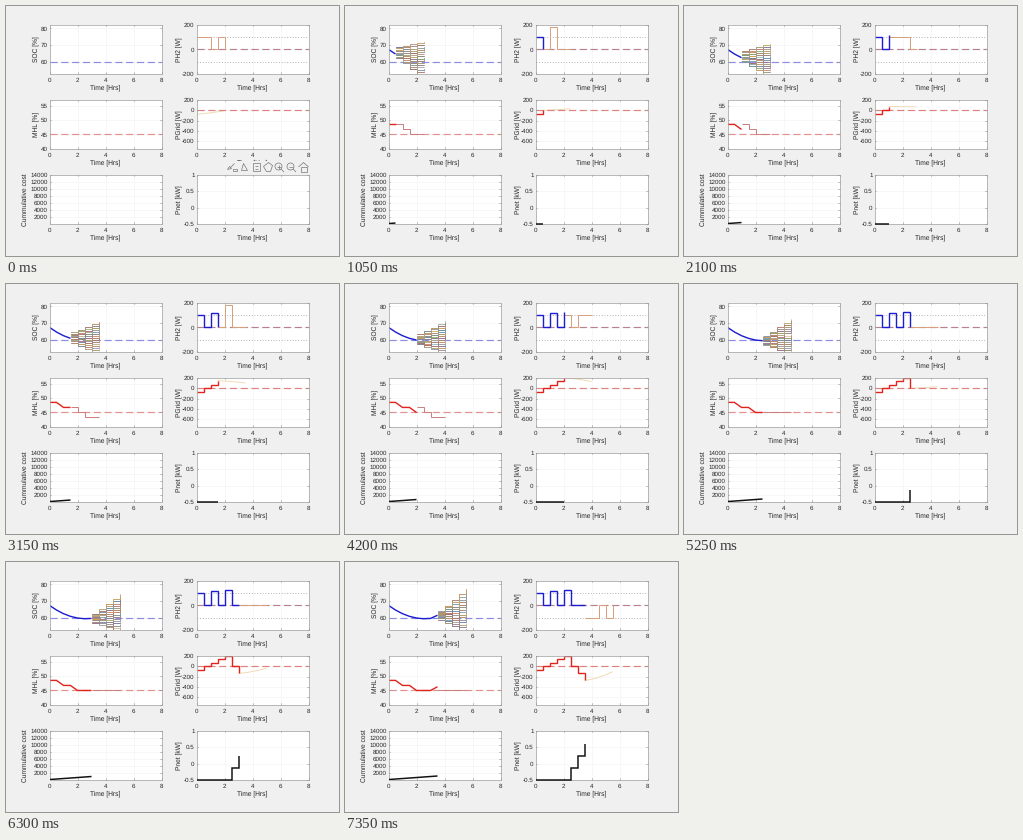
A matplotlib script for the animation above (8000 ms loop, 333 by 250 pixels).

```python
import numpy as np
import matplotlib.pyplot as plt
from matplotlib.animation import FuncAnimation
from matplotlib.collections import LineCollection
from matplotlib.patches import Circle, Polygon, Rectangle

W, H, DPI = 333, 250, 100
PX = 72 / DPI
BG = "#f0f0f0"
BLUE, RED, BLACK = "#1c1cd0", "#e0241c", "#111111"
HUES = ["#5b8fb8", "#d98c63", "#d8b45c", "#8f6f9c", "#8fa868", "#86b4cc", "#a8606c"]
STATE_MS, TICK_MS, LOOP_MS = 1050, 50, 8000
STEP, STATES = 0.5, 8

plt.rcParams.update({"font.family": "Liberation Sans", "text.hinting": "none"})
fig = plt.figure(figsize=(W / DPI, H / DPI), dpi=DPI, facecolor=BG)
ax = fig.add_axes([0, 0, 1, 1])
ax.set(xlim=(-0.5, W - 0.5), ylim=(H - 0.5, -0.5))
ax.axis("off")


def label(x, y, s, size, **kw):
    kw = {"ha": "center", "va": "center", **kw}
    ax.text(x, y, s, fontsize=size * PX, color="#262626", **kw)


def rule(xs, ys, color, z):
    ax.plot(xs, ys, color=color, lw=0.6 * PX, zorder=z)


class Panel:
    """A plot box in stage pixels with its own data scale."""
    w, h = 112, 49

    def __init__(self, col, row, lo, hi, ticks, name, name_x):
        self.left, self.top = 43 + 147 * col, 18.4 + 75 * row
        self.lo, self.hi = lo, hi
        right, bottom = self.left + self.w, self.top + self.h
        middle = self.left + self.w / 2
        self.box = Rectangle((self.left, self.top), self.w, self.h,
                             fc="white", ec="none", zorder=0)
        ax.add_patch(self.box)
        for v in ticks:
            y = self.y(v)
            rule([self.left, right], [y, y], "#f3f3f3", 1)
            for x, d in ((self.left, 1.5), (right, -1.5)):
                rule([x, x + d], [y, y], "#999999", 8)
            label(self.left - 2, y, f"{v:g}", 6.3, ha="right", va="center_baseline")
        for t in range(0, 9, 2):
            x = self.x(t)
            rule([x, x], [self.top, bottom], "#f3f3f3", 1)
            for y, d in ((bottom, -1.5), (self.top, 1.5)):
                rule([x, x], [y, y + d], "#999999", 8)
            label(x, bottom + 6.3, str(t), 6.3)
        ax.add_patch(Rectangle((self.left, self.top), self.w, self.h, fc="none",
                               ec="#a0a0a0", lw=0.7 * PX, zorder=7))
        label(middle, bottom + 14.3, "Time [Hrs]", 6.7)
        label(name_x, self.top + self.h / 2, name, 6.7, rotation=90)

    def x(self, t):
        return self.left + np.asarray(t) * self.w / 8

    def y(self, v):
        return self.top + (self.hi - np.asarray(v)) * self.h / (self.hi - self.lo)

    def line(self, t, v, color, lw=1.4, z=6, **kw):
        art, = ax.plot(self.x(t), self.y(v), color=color, lw=lw * PX, zorder=z,
                       solid_joinstyle="miter", solid_capstyle="butt", **kw)
        art.set_clip_path(self.box)
        return art

    def level(self, v, color, dashes=(6, 3), lw=1.2):
        self.line([0, 8], [v, v], color, lw, 3, dashes=dashes, dash_capstyle="butt")


def stairs(t0, values):
    """Hold each value for one step; the last value only ends the path."""
    t = t0 + STEP * np.arange(len(values))
    return np.repeat(t, 2)[1:], np.repeat(values, 2)[:-1]


soc = Panel(0, 0, 53, 82, (60, 70, 80), "SOC [%]", 29)
ph2 = Panel(1, 0, -200, 200, (-200, 0, 200), "PH2 [W]", 172.3)
mhl = Panel(0, 1, 40, 57, range(40, 56, 5), "MHL [%]", 29)
grid = Panel(1, 1, -750, 200, range(-600, 201, 200), "PGrid [W]", 172.3)
cost = Panel(0, 2, 0, 14000, range(2000, 14001, 2000), "Cummulative cost", 18.7)
pnet = Panel(1, 2, -0.5, 1, (-0.5, 0, 0.5, 1), "Pnet [kW]", 172.3)

soc.level(60, "#8c8ce4")
ph2.level(0, "#b9808f")
mhl.level(45, "#e59090")
grid.level(0, "#e08080")
for power in (-100, 100):
    ph2.level(power, "#909090", (1, 2.4), 0.8)

# Measured values, one per half hour
K = np.arange(STATES)
T = K * STEP
SOC = 59.6 + 1.17 * (T - 2.6) ** 2 + 2.2 * np.maximum(T - 3, 0)
MHL = 48.5 - 1.75 * np.minimum(K // 2, 2) + 1.3 * np.maximum(K - 6, 0)
COST = 100 + 145 * K
PH2 = np.where((K % 2 == 0) & (K < 5), 103 + 11 * T, 0)
GRID = np.where(K < 5, np.minimum(73 * K - 75, 200), -137 * (K - 5))
PNET = 0.37 * np.maximum(K - 4, 0) - 0.5

# Planned on/off steps of the hydrogen unit, one plan per state
PLANS = "11010 01000 11100 01000 10111 00000 00000 11010".split()


def soc_fan(k):
    """Many stepped futures that spread out from the measured charge."""
    rng = np.random.default_rng(k)
    count, j = 80, np.arange(4)
    hi = SOC[k] + 4.5 - 0.3 * k + j * (0.3 + 0.43 * k)
    lo = SOC[k] - 2.5 + (55.5 - SOC[k]) * j / 3
    levels = 8 + 2 * j
    paths = []
    for base in np.linspace(0, 1, count):
        q = np.clip(base + rng.normal(0, 0.13, 4), 0, 1)
        v = lo + (hi - lo) * np.round(q * levels) / levels
        t, v = stairs(T[k], np.append(v, v[-1] + base * k / 2))
        paths.append(np.column_stack([soc.x(t), soc.y(v)]))
    art = LineCollection(paths, colors=HUES, linewidths=0.7 * PX, alpha=0.65, zorder=4)
    ax.add_collection(art)
    art.set_clip_path(soc.box)
    return art


def ph2_plan(k):
    on = np.array(list(PLANS[k]), int)
    power = 180 if on.sum() == 1 else 103    # a lone pulse is stronger
    if k == STATES - 1:
        power = -100
    return ph2.line(*stairs(T[k], on * power), "#d8a07c", 1, 5)


def mhl_plan(k):
    start = MHL[k - 1]
    drop = 1.6 * np.minimum(np.arange(5), 2) * (start > 45)
    return mhl.line(*stairs(T[k], start - drop), "#cc8080", 1, 4)


def grid_plan(k):
    u = np.linspace(0, 1, 20)
    v = GRID[k] + 0.5 * (60 - GRID[k]) * u ** 1.5
    return grid.line(T[k] + 2 * u, v, "#f0dcb4", 1, 2)


def toolbar():
    """A row of small outline icons over the lower right panel."""
    kw = dict(fc="none", ec="#777777", lw=0.7 * PX, zorder=12)
    arts = [Rectangle((219, 154.5), 84, 12.5, fc=BG, ec="none", zorder=11),
            Polygon([(221, 163), (223, 160), (225, 162)], **kw),
            Rectangle((226, 162), 4, 2, **kw),
            Polygon([(235, 164), (237, 157), (241, 164)], **kw),
            Rectangle((246, 156.5), 7, 8, **kw),
            Polygon([(257, 160), (260, 165), (264, 165), (266, 159), (262, 156)], **kw),
            Polygon([(292, 160.5), (297, 156), (302, 160.5)], closed=False, **kw),
            Rectangle((294, 160.5), 6, 4.5, **kw)]
    marks = [[(224, 161), (228, 157)], [(248, 159), (251, 159)],
             [(248, 162), (251, 162)], [(272, 158), (272, 162)]]
    for x in (272, 284):
        arts.append(Circle((x, 160), 3.5, **kw))
        marks += [[(x - 2, 160), (x + 2, 160)], [(x + 2.5, 162.5), (x + 5.5, 165.5)]]
    for a in arts:
        ax.add_patch(a)
    lines = LineCollection(marks, colors=kw["ec"], linewidths=kw["lw"], zorder=12)
    ax.add_collection(lines)
    return arts + [lines]


def build(k):
    arts = [ph2_plan(k), grid_plan(k)]
    if k == 0:
        return arts + toolbar()
    past = slice(0, k + 1)
    arts += [soc_fan(k), mhl_plan(k),
             soc.line(T[past], SOC[past], BLUE),
             mhl.line(T[past], MHL[past], RED),
             cost.line(T[past], COST[past], BLACK, 1.5, 9),
             ph2.line(*stairs(0, PH2[past]), BLUE),
             grid.line(*stairs(0, GRID[past]), RED),
             pnet.line(*stairs(0, PNET[past]), BLACK, 1.5, 9)]
    arts[-1].set_clip_on(False)
    return arts


states = [build(k) for k in range(STATES)]


def update(i):
    now = min(i * TICK_MS // STATE_MS, STATES - 1)
    for k, arts in enumerate(states):
        for a in arts:
            a.set_visible(k == now)
    return []


anim = FuncAnimation(fig, update, frames=LOOP_MS // TICK_MS, interval=TICK_MS,
                     init_func=lambda: update(0), repeat=True, repeat_delay=0)
plt.show()
```
